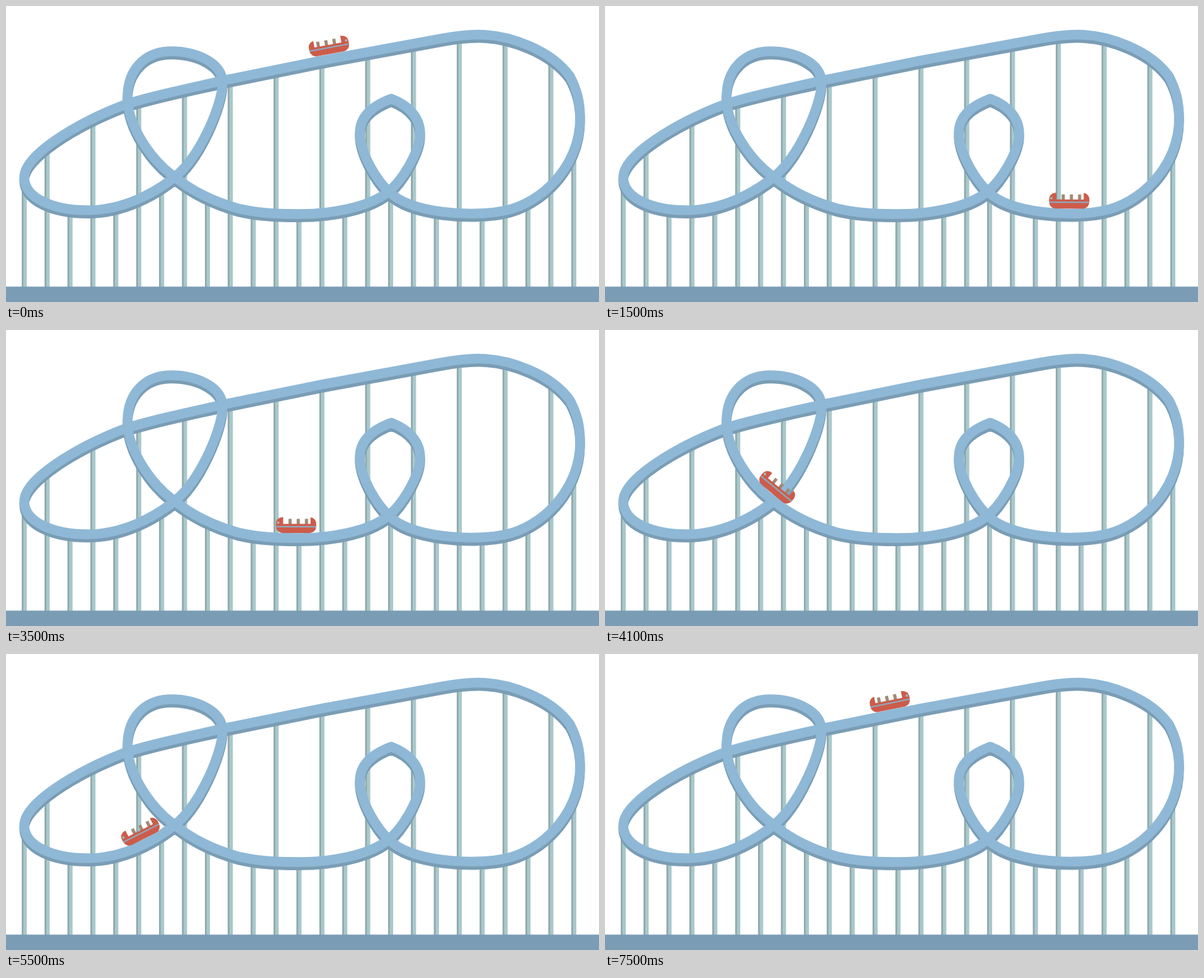
An HTML page that plays this animation: 942x471 px, repeating every 7.6 s.

```html
<!DOCTYPE html>
<html lang="en">
<head>
<meta charset="utf-8">
<title>Roller coaster</title>
<style>
  html, body { margin: 0; width: 100%; height: 100%; overflow: hidden; background: #fff; }
  svg { display: block; width: 100%; height: 100%; }
  .track { fill: none; stroke-width: 15.4; stroke-linejoin: round; }
</style>
</head>
<body>
<svg viewBox="0 0 942 471">
  <defs>
    <path id="rail" d="M500 87 L690 52 C715 47.5 735 45.5 750 45.5
      C800 45.5 866 70 896 112 C907 133 912 152 912 178 C912 255 850 315 790 326
      C740 336 642 330 608 295 C585 273 562 230 562 202 S584 158 612 147.5
      C640 158 658 178 658 203 S632 275 608 295
      C575 322 512 331 465 331 S395 328 368 322 C330 311 296 295 268 272
      C230 245 193 190 193 145 S222 72 262 72 S344 90 344 122 S310 238 268 272
      C236 298 185 325 130 325 S29 306 29 272 S110 187 190 156.5
      C235 142 290 131 345 118.5 Z"/>
  </defs>
  <g id="pillars"></g>
  <use href="#rail" class="track" stroke="#7a9db5" y="5.4"/>
  <use href="#rail" class="track" stroke="#8fb8d6"/>
  <rect y="446.5" width="942" height="25" fill="#7a9db5"/>
  <g id="car">
    <path fill="#a08a76" d="M-19-10h5v9h-5z m13 0h5v9h-5z m13 0h5v9h-5z"/>
    <path fill="#cc5c4b" d="M-23-12.5V-2H20.5V-12.5H22A10 10 0 0 1 32-2V2
      A10.5 10.5 0 0 1 21.5 12.5H-21.5A10.5 10.5 0 0 1-32 2V-2A10 10 0 0 1-23-12.5Z"/>
    <path stroke="#8fa9bd" stroke-width="2.2" d="M-31.5 2.5H31.5"/>
    <circle cx="28.5" cy="-4" r="2" fill="#a9b4ba"/>
  </g>
</svg>
<script>
const LOOP = 7600, STEP = 100, GROUND = 447;
const RIDE_HEIGHT = 20.5, CROSSING = 150;
const rail = document.getElementById('rail');
const car = document.getElementById('car');

const total = rail.getTotalLength();
const at = d => rail.getPointAtLength((d + total) % total);
const samples = Array.from({ length: Math.floor(total) }, (_, d) => at(d));

function distanceOf(x, y) {
  const gaps = samples.map(p => Math.hypot(p.x - x, p.y - y));
  return gaps.indexOf(Math.min(...gaps));
}

const rightEnd = distanceOf(912, 185), leftEnd = distanceOf(29, 270);

// Pillars alternate between the lowest rail and the upper run between the two ends.
let bars = '';
for (let k = 0; k < 25; k++) {
  const x = 25 + k * 36.375;
  const over = samples.filter((p, d) => Math.abs(p.x - x - 4) < 1.5 &&
    (k % 2 === 0 || d < rightEnd || d > leftEnd)).map(p => p.y);
  const y = k % 2 ? Math.min(...over) : Math.max(...over);
  const bar = (w, fill) =>
    `<rect x="${x}" y="${y}" width="${w}" height="${GROUND - y}" fill="${fill}"/>`;
  bars += bar(8, '#a9c8cb') + bar(2.6, '#8fa8ab');
}
document.getElementById('pillars').innerHTML = bars;

// Time and the rail point the car has reached.
const keys = [
  [0, 517, 84], [800, 904, 130], [1500, 737.5, 332], [2600, 636, 159], [3500, 461, 331],
  [4700, 237, 78], [6300, 117, 190], [7200, 387, 110], [7500, 456.5, 96]
].map(([t, x, y]) => ({ t, d: distanceOf(x, y) }));
const last = keys.length - 1;
const pace = i => (keys[i + 1].d - keys[i].d) / (keys[i + 1].t - keys[i].t);
keys.forEach((k, i) => {
  k.v = (pace(Math.max(i - 1, 0)) + pace(Math.min(i, last - 1))) / 2;
});

// Smooth curve through the keys, keeping the speed continuous.
function travelled(t) {
  let i = 0;
  while (i < last - 1 && t >= keys[i + 1].t) i++;
  const a = keys[i], b = keys[i + 1], span = b.t - a.t, u = (t - a.t) / span;
  const s = u * u * (3 - 2 * u);
  return a.d + (b.d - a.d) * s + span * u * (1 - u) * (a.v * (1 - u) - b.v * u);
}

function draw(now) {
  const d = travelled(Math.floor(now % LOOP / STEP) * STEP);
  const p = at(d), back = at(d - 14), ahead = at(d + 14);
  const angle = Math.atan2(ahead.y - back.y, ahead.x - back.x);
  // The car changes sides of the rail at both far ends.
  const side = Math.max(-1, Math.min(1, Math.max(rightEnd - d, d - leftEnd) / CROSSING));
  const x = p.x + Math.sin(angle) * RIDE_HEIGHT * side;
  const y = p.y - Math.cos(angle) * RIDE_HEIGHT * side;
  car.setAttribute('transform',
    `translate(${x} ${y}) rotate(${angle * 180 / Math.PI}) scale(1 ${side < 0 ? -1 : 1})`);
}

const start = performance.now();
function tick() {
  draw(performance.now() - start);
  requestAnimationFrame(tick);
}
tick();
</script>
</body>
</html>
```
